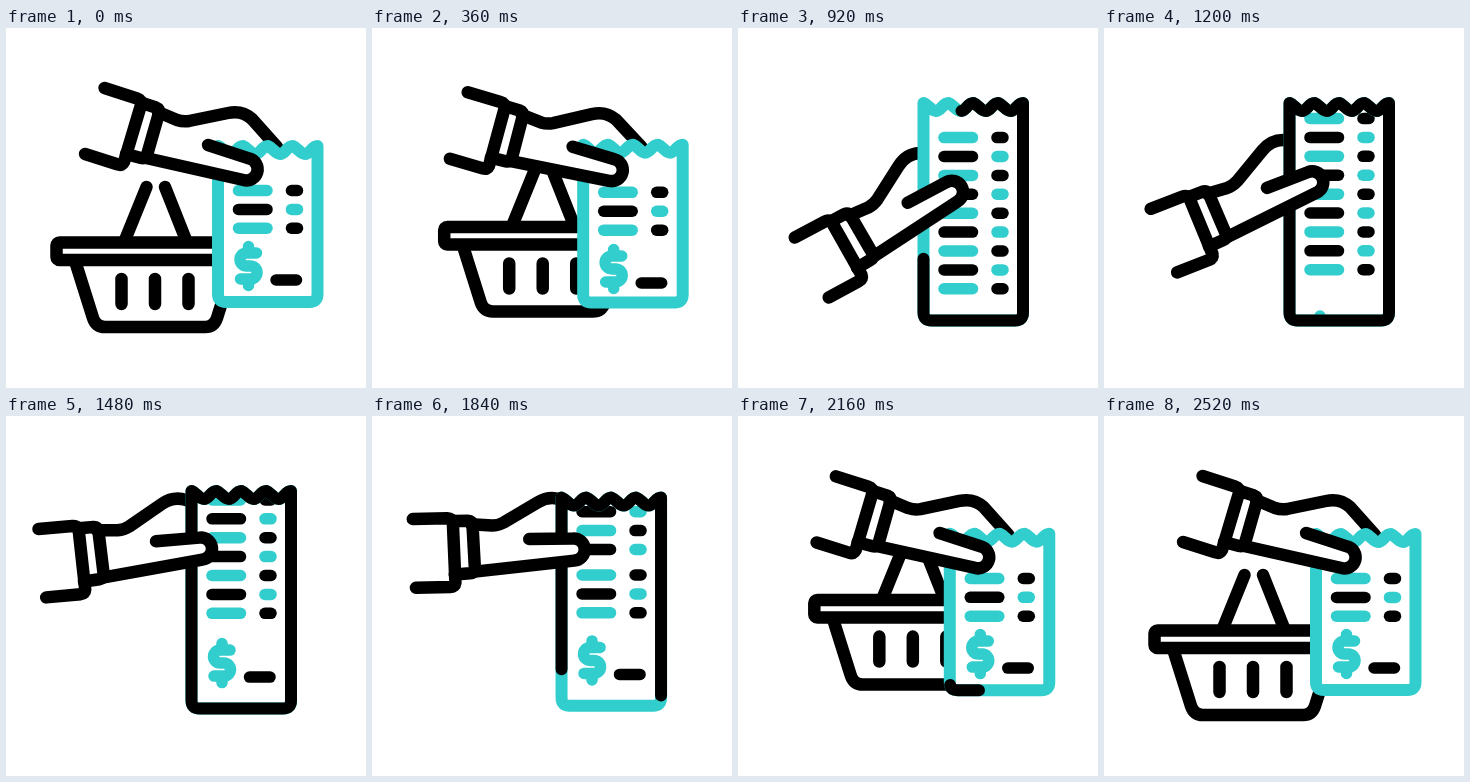
These frames come from a looping animation (360x360 px, 2800 ms). An HTML page:

```html
<!DOCTYPE html>
<html lang="en">
<head>
<meta charset="utf-8">
<title>Shopping receipt</title>
<style>
  html, body { margin: 0; width: 100%; height: 100%; overflow: hidden; background: #fff; }
  svg { display: block; width: 100vw; height: 100vh; }
  .ink { fill: none; stroke: #000; stroke-width: 12.5; stroke-linecap: round; stroke-linejoin: round; }
  .outline { stroke-width: 12; }
  .print { stroke-width: 11.5; }
  .teal { stroke: #32cdcd; }
  .paper { fill: #fff; }
</style>
</head>
<body>
<svg viewBox="0 0 360 360">
  <defs>
    <clipPath id="inside"><path id="insidePath"/></clipPath>
    <clipPath id="leftOf"><rect id="leftRect" width="360" height="360"/></clipPath>
  </defs>

  <g clip-path="url(#leftOf)">
    <g id="basket" class="ink">
      <path d="M140.500 159L119 212M159 159L180 212"/>
      <path d="M70 236L87 290Q90 299 99 299H199Q208 299 211 290L228 236"/>
      <path d="M115.500 251V276M149 251V276M182.500 251V276"/>
      <rect class="paper" x="50.500" y="214.500" width="197" height="17.500" rx="3"/>
    </g>
  </g>

  <g id="handBack">
    <path class="paper" d="M152 84L177 94L222 85Q236 82 246 91L270 118L240 151L138 130Z"/>
    <g class="ink">
      <path d="M152 84L171 92Q177 94 183 93L222 85Q236 82 246 91L271 119"/>
      <path d="M98.500 60L131 70.500Q136 72 135 77L118 134Q116 138 112 136.500L79 126"/>
      <path d="M136 75L150 79.500Q154 81 153 85L141 127Q139 131 135 130L120 126"/>
    </g>
  </g>

  <path id="sheet" class="paper"/>
  <g clip-path="url(#inside)">
    <g id="content" class="ink print">
      <g id="upper"></g>
      <g id="lower"></g>
      <g id="total">
        <path class="teal" d="M8 -13H-2A6.500 6.500 0 0 0 -2 0H2A6.500 6.500 0 0 1 2 13H-8M0 -19.500V-14M0 14V19.500"/>
        <path d="M27.500 14H48"/>
      </g>
    </g>
  </g>
  <path id="edge" class="ink outline teal"/>
  <path id="trace" class="ink outline" pathLength="100"/>

  <g id="thumb">
    <path class="paper" d="M185 139L237.500 152A11 11 0 0 0 243.500 130.600L202 117Z"/>
    <path class="ink" d="M140 130L237.500 152A11 11 0 0 0 243.500 130.600L202 117"/>
  </g>
</svg>
<script>
const LOOP = 2800, STEP = 18.9;
const $ = id => document.getElementById(id);
const ramp = (t, a, b) => Math.min(1, Math.max(0, (t - a) / (b - a)));
const mix = (a, b, k) => a + (b - a) * k;

// Cubic ease in and out between two times.
function ease(t, a, b) {
  const u = ramp(t, a, b);
  return u < .5 ? 4 * u ** 3 : 1 - 4 * (1 - u) ** 3;
}

// The left bar and its partner on the right swap colours row by row.
function addRows(id, count) {
  for (let i = 0; i < count; i++) {
    const y = i * STEP, tone = on => on ? 'teal' : '';
    $(id).innerHTML += `<path class="${tone(i % 2 === 0)}" d="M20.500 ${y}H49"/>`
      + `<path class="${tone(i % 2 === 1)}" d="M73.500 ${y}H79.500"/>`;
  }
}
addRows('upper', 6);
addRows('lower', 3);

function sheetPath(x, top, bottom) {
  const w = 99.5, h = w / 8, r = x + w, c = 8;
  const tooth = `c${h * .45} 2 ${h * .6} 8 ${h} 8s${h * .55} -8 ${h} -8`;
  return `M${x} ${top}${tooth.repeat(4)}V${bottom - c}Q${r} ${bottom} ${r - c} ${bottom}`
    + `H${x + c}Q${x} ${bottom} ${x} ${bottom - c}Z`;
}

const move = (id, x, y) => $(id).setAttribute('transform', `translate(${x} ${y})`);

function drawSheet(t, x, grow) {
  const d = sheetPath(x, 118 - 43 * grow, 274 + 18.5 * grow);
  for (const id of ['sheet', 'insidePath', 'edge', 'trace']) $(id).setAttribute('d', d);

  // The black line runs round the sheet while both of its ends drift on.
  const gone = 100 * ease(t, 1514, 2372);
  const len = 100 * ease(t, 600, 1160) - gone;
  const from = 1 + 73 * ramp(t, 620, 2200) ** 1.5 + gone;
  const trace = $('trace');
  trace.style.display = len > .1 ? '' : 'none';
  trace.setAttribute('stroke-dasharray', len > 99.9 ? 'none' : `${len} ${100 - len}`);
  trace.setAttribute('stroke-dashoffset', -(from % 100));
}

function drawBasket(t, x) {
  const away = Math.max(1 - ramp(t, 1798, 2520), 0) * (t > LOOP / 2)
    + ramp(t, 200, 543) * (t <= LOOP / 2);
  const lift = ease(t, 200, 520) - ease(t, 2130, 2520);
  move('basket', 210 * away ** 3, -30.5 * lift);
  $('leftRect').setAttribute('width', x + 90);
}

function draw(t) {
  const grow = ease(t, 243, 840) - ease(t, 1640, 2237);
  const swipe = ease(t, 920, 1590);
  const x = 212 - 26.5 * grow;
  // From rest to a pose that itself goes from low to swiped.
  const pose = (rest, low, swiped) => mix(rest, mix(low, swiped, swipe), grow);

  drawSheet(t, x, grow);
  drawBasket(t, x);

  const lower = pose(162.5, 223, 158.4);
  move('content', x, 0);
  move('lower', 0, lower);
  move('upper', 0, lower - 6 * STEP - 43.6 * (1 - grow));
  move('total', 30.5, pose(238, 333.5, 245.6));

  const hand = `translate(${pose(240, 213.3, 194)} ${pose(141, 164, 132)})`
    + ` rotate(${pose(0, -46, -22.5)}) translate(-240 -141)`;
  $('handBack').setAttribute('transform', hand);
  $('thumb').setAttribute('transform', hand);
}

const start = performance.now();
function tick() {
  draw((performance.now() - start) % LOOP);
  requestAnimationFrame(tick);
}
tick();
</script>
</body>
</html>
```
